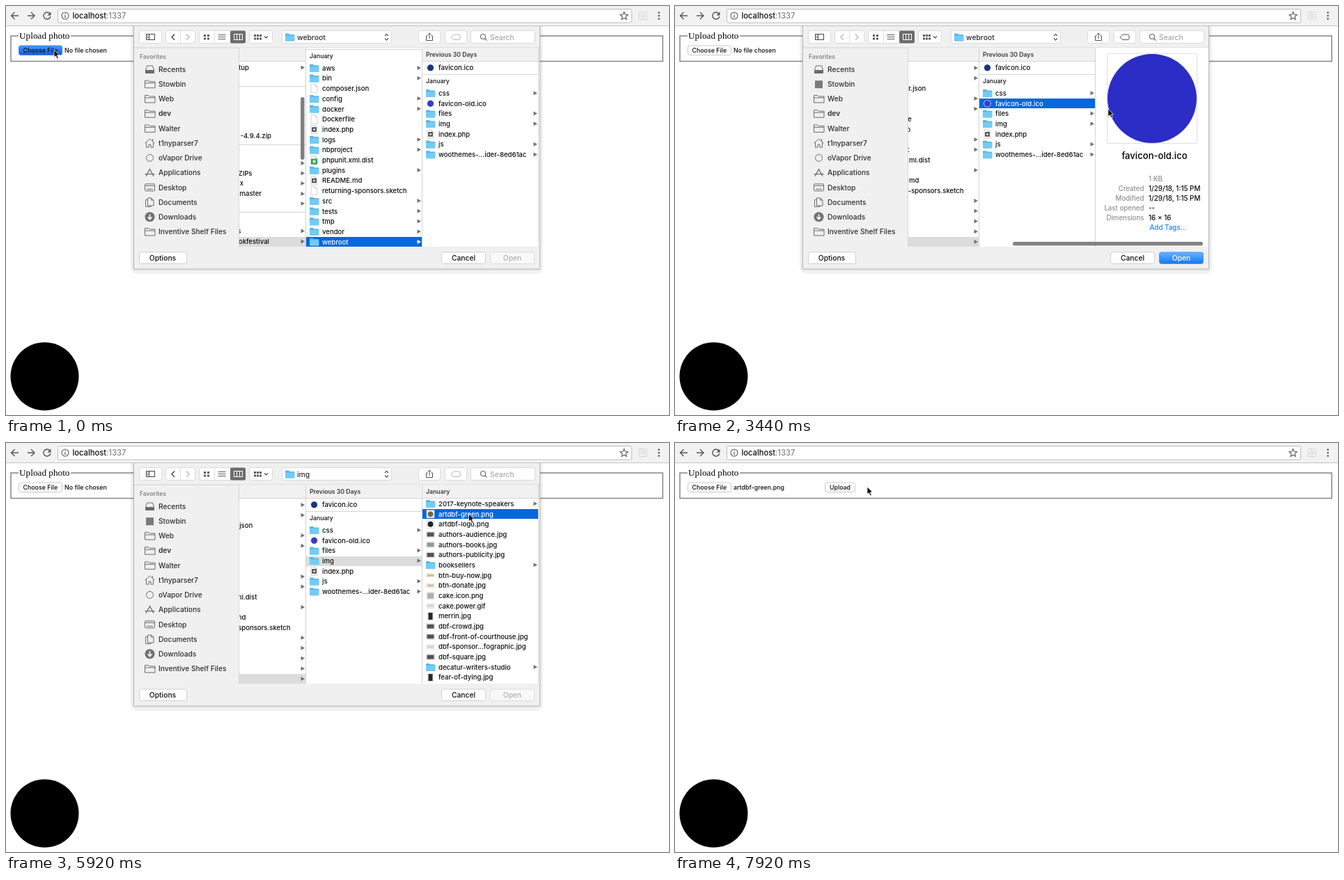
An HTML page for the animation above (8 s loop, 952x588 px).

```html
<!DOCTYPE html>
<html lang="en">
<head>
<meta charset="utf-8">
<title>Upload photo</title>
<style>
  html, body { margin: 0; width: 100%; height: 100%; overflow: hidden; background: #fff; }
  #stage { display: block; width: 100vw; height: 100vh; }
  text { font-family: Inter, "Open Sans", sans-serif; white-space: pre; }
  .serif { font-family: "Liberation Serif", serif; }
</style>
</head>
<body>
<svg id="stage" viewBox="0 0 952 588">
  <defs>
    <linearGradient id="blue" x2="0" y2="1">
      <stop stop-color="#66b4fb"/><stop offset="1" stop-color="#1278f8"/>
    </linearGradient>
    <linearGradient id="pressed" x2="0" y2="1">
      <stop stop-color="#4a9af6"/><stop offset="1" stop-color="#0a5ce4"/>
    </linearGradient>
  </defs>
  <g id="page"></g>
  <svg x="0" y="29" width="952" height="559" viewBox="0 29 952 559"><g id="dialog"></g></svg>
  <g id="cursor"></g>
</svg>
<script>
const LOOP = 8000, TICK = 80;
const INK = '#0c0c0c', GREY = '#6c6c6c', DIM = '#b4b4b4', SELECT = '#0867dc';
const byId = id => document.getElementById(id);

// Drawing helpers; text is placed by its visual centre line.
const text = (x, y, s, size = 9.55, { fill = INK, weight = 450, anchor = 'start', cls = '' } = {}) =>
  `<text class="${cls}" x="${x}" y="${y + size * .36}" font-size="${size}" fill="${fill}" font-weight="${weight}" text-anchor="${anchor}">${s}</text>`;
const rect = (x, y, w, h, fill, rx = 0, extra = '') =>
  `<rect x="${x}" y="${y}" width="${w}" height="${h}" rx="${rx}" fill="${fill}" ${extra}/>`;
const disc = (x, y, r, fill, extra = '') => `<circle cx="${x}" cy="${y}" r="${r}" fill="${fill}" ${extra}/>`;
const line = (d, stroke = GREY, width = 1, fill = 'none') =>
  `<path d="${d}" fill="${fill}" stroke="${stroke}" stroke-width="${width}"/>`;
const solid = (d, fill) => `<path d="${d}" fill="${fill}"/>`;
const button = (x, y, w, h, fill = '#fff', border = '#c6c6c6') =>
  rect(x + .5, y + .5, w - 1, h - 1, fill, 3, `stroke="${border}" stroke-width=".8"`);
const label = (x, y, s, fill = INK) => text(x, y, s, 10.3, { fill, anchor: 'middle' });

const folder = (x, y) =>
  solid(`M${x} ${y - 4.5}q0-1 1-1h4l1.3 1.4h6q1 0 1 1v7.6q0 1-1 1H${x + 1}q-1 0-1-1z`, '#55b7e6') +
  rect(x, y - 2.6, 13.3, 8, '#73cbf3', 1);
const sheet = (x, y) => line(`M${x + 2} ${y - 6}h6l3 3v9h-9zM${x + 8} ${y - 6}v3h3`, '#bdbdbd', .7, '#fff');

// ---- File lists ----
const WEBROOT = 'aws bin composer.json config docker Dockerfile index.php logs nbproject phpunit.xml.dist plugins README.md returning-sponsors.sketch src tests tmp vendor webroot'.split(' ');
const CONTENTS = 'css favicon-old.ico files img index.php js woothemes-...ider-8ed61ac'.split(' ');
const IMAGES = '2017-keynote-speakers artdbf-green.png artdbf-logo.png authors-audience.jpg authors-books.jpg authors-publicity.jpg booksellers btn-buy-now.jpg btn-donate.jpg cake.icon.png cake.power.gif merrin.jpg dbf-crowd.jpg dbf-front-of-courthouse.jpg dbf-sponsor...fographic.jpg dbf-square.jpg decatur-writers-studio fear-of-dying.jpg'.split(' ');
const isFolder = name => name !== 'Dockerfile' && !/\.\w+$/.test(name);

function thumbnail(name, x, y) {
  const frame = (w, h, fill) =>
    rect(x + 6.5 - w / 2, y - h / 2, w, h, '#fff', 0, 'stroke="#ccc" stroke-width=".6"') +
    rect(x + 7.5 - w / 2, y + 1 - h / 2, w - 2, h - 2, fill);
  if (/^artdbf/.test(name)) return frame(11, 11, '#fff') + disc(x + 6.5, y, 4, /green/.test(name) ? '#716a43' : '#222');
  if (/^(merrin|fear)/.test(name)) return frame(8, 12, '#252825');
  if (/^btn/.test(name)) return frame(11, 5, '#d9b77c');
  if (/power|sponsor/.test(name)) return frame(11, 6, '#d5d5d0');
  if (/icon/.test(name)) return frame(11, 10, '#b7aca7');
  return frame(12, 8, /books/.test(name) ? '#8d9994' : '#565150');
}

function fileIcon(name, x, y) {
  if (isFolder(name)) return folder(x, y);
  if (/\.ico$/.test(name)) return disc(x + 6.5, y, 5.3, '#dcdcf0') + disc(x + 6.5, y, 4.5, /old/.test(name) ? '#3a3ac4' : '#17347d');
  if (/\.(png|jpg|gif)$/.test(name)) return thumbnail(name, x, y);
  if (/\.(php|md)$/.test(name)) return sheet(x, y) + rect(x + 3.2, y - 3.2, 6.6, 6.6, '#4b4b4b') + rect(x + 5, y - 1.2, 3, 2.6, '#ddd');
  if (/xml/.test(name)) return sheet(x, y) + rect(x + 2, y - 2, 9, 8, '#2f9d58') + rect(x + 4.5, y, 4, 4, '#c7ead3');
  return sheet(x, y);
}

const arrow = (x, y, fill = '#727272') => solid(`M${x - 2.5} ${y - 3}l5.5 3l-5.5 3z`, fill);

function row(name, x, y, mark) {
  const on = mark === 'active';
  return (mark ? rect(x, Math.round(y - 7), 167, 14, on ? SELECT : '#dcdcdc') : '') +
    fileIcon(name, x + 5, y) + text(x + 23, y, name, 9.55, { fill: on ? '#fff' : INK }) +
    (isFolder(name) ? arrow(x + 162, y - .3, on ? '#fff' : undefined) : '');
}

// ---- Finder columns ----
function parentColumn(x) {
  const ends = [[349, 89, 'tup'], [381, 187, '-4.9.4.zip'], [353.5, 240.5, 'ZIPs'], [341, 255, 'x'],
    [367, 270, 'master'], [337.5, 324, 's'], [378, 338.8, 'okfestival']];
  return rect(x, 332, 167, 14, '#dcdcdc') +
    ends.map(([end, y, s]) => text(x + end - 264, y, s, 9.55, { anchor: 'end' })).join('') +
    [115.5, 199.5, 296.5].map(y => line(`M${x} ${y}h167`, '#d4d4d4')).join('') +
    [88.5, 142, 157, 171, 226, 240.5, 255, 270, 284, 323.5, 338.5].map(y => arrow(x + 162, y)).join('');
}

function preview(x, { name, kind, size, color }) {
  const facts = [['', kind], ['Created', '1/29/18, 1:15 PM'], ['Modified', '1/29/18, 1:15 PM'],
    ['Last opened', '--'], ['Dimensions', size]];
  return rect(x + 16.5, 68.5, 129, 129, '#fff', 1, 'stroke="#dedede"') + disc(x + 81, 133, 64, color) +
    text(x + 84.5, 215.7, name, 13.1, { anchor: 'middle', fill: '#000' }) +
    facts.map(([key, value], i) => {
      const y = 248.5 + 14 * i;
      return text(x + 69.5, y, key, 9.7, { fill: '#8f8f8f', anchor: 'end' }) +
        text(x + 76, y, value, 9.9, { fill: i ? INK : '#8f8f8f' });
    }).join('') + text(x + 77.5, 318.5, 'Add Tags...', 9.8, { fill: '#1a84f5' });
}

function columns(s) {
  const at = i => 264 + 167 * i - s.scroll;
  const mark = (i, name) => s.chosen[i] !== name ? '' : i === s.chosen.length - 1 ? 'active' : 'path';
  const list = (i, names, top, step) => names.map((n, k) => row(n, at(i), top + step * k, mark(i, n))).join('');
  const head = (i, title) => text(at(i) + 5, 70, title, 8.7, { weight: 600, fill: '#3c3c3c' });
  let out = rect(334, 60, 432, 286, '#fff') + rect(334, 60, 432, 19, '#f1f1f1') + line('M334 79.5H766', '#d6d6d6');
  out += parentColumn(at(0));
  out += s.opening
    ? rect(at(1), 60, 167, 20, '#fff') + line(`M${at(1)} 62.5h167`, '#d4d4d4') + text(at(1) + 5, 72, 'January', 8.7)
    : head(1, 'March');
  out += list(1, WEBROOT, 89.3, 14.7);
  out += head(2, 'Previous 30 Days') + row('favicon.ico', at(2), 88.8, '') + line(`M${at(2)} 98.5h167`, '#d4d4d4') +
    text(at(2) + 5, 108, 'January', 8.7) + list(2, CONTENTS, 125.5, 14.7);
  if (s.folder === 'img') out += head(3, 'January') + list(3, IMAGES, 87.5, 14.68);
  if (s.file) {
    const x = at(s.folder === 'img' ? 4 : 3);
    out += rect(x, 60, 180, 286, '#fff') + preview(x, s.file);
  }
  for (let i = 1; i < 5; i++) out += line(`M${at(i) - .5} 60V346`, '#d4d4d4');
  if (s.vbar) out += rect(423, 131, 5.5, 90, '#808080', 2.7);
  if (s.bar) out += rect(s.bar, 339, 758 - s.bar, 5.5, '#828282', 2.7);
  return `<svg x="334" y="60" width="432" height="286" viewBox="334 60 432 286">${out}</svg>`;
}

// ---- Dialog chrome ----
function sidebar(s) {
  const tray = y => line(`M200.5 ${y + 1}l2-6h8l2 6v4.5h-12z`) + rect(201, y + 1, 11, 4, GREY);
  const plainFolder = y => line(`M199.5 ${y - 5}h5l1.5 1.5h8v9h-14.5zM199.5 ${y - 1.5}h14.5`);
  const square = y => rect(201, y - 5, 11, 11, '#7a7a7a');
  const home = y => line(`M199.5 ${y}l7-6l7 6M201.5 ${y - 1}v7h3.5v-4h3v4h3.5v-7M210.5 ${y - 3}v-3`);
  const ring = y => disc(206.5, y, 5, 'none', `stroke="${GREY}"`);
  const tools = y => line(`M201 ${y + 5}l5.5-10l5.5 10M199.5 ${y + 2}h14`, GREY, 1.2);
  const desk = y => rect(199.5, y - 5, 14, 10, '#eee', 1, `stroke="${GREY}"`) + line(`M200 ${y - 2.5}h13M202 ${y + 2.5}h9`);
  const docs = y => line(`M203.5 ${y - 6}h5l3.5 3v8h-8.5zM208.5 ${y - 6}v3h3.5M203 ${y - 3.5}h-2.5v10h7.5v-1.5`);
  const down = y => disc(206.5, y, 7, '#717171') + line(`M206.5 ${y - 4}v7M203.5 ${y}l3 3.5l3-3.5`, '#fff', 1.5);
  const items = [['Recents', tray], ['Stowbin', s.opening ? plainFolder : square], ['Web', plainFolder],
    ['dev', plainFolder], ['Walter', plainFolder], ['t1nyparser7', home], ['oVapor Drive', ring],
    ['Applications', tools], ['Desktop', desk], ['Documents', docs], ['Downloads', down],
    ['Inventive Shelf Files', plainFolder]];
  return text(192, 72.5, 'Favorites', 8.5, { weight: 600, fill: '#868686' }) +
    items.map(([name, icon], i) => {
      const y = 91 + 21.23 * i;
      return icon(y) + text(219, y, name, 10.2, { fill: '#2e2e2e', weight: name === 'dev' ? 600 : 450 });
    }).join('');
}

function toolbar(s) {
  const wells = [[191, 33], [229, 43], [277, 67], [349, 34], [396, 158], [592, 32], [630, 32], [667, 93]];
  let dots = '';
  for (const [x, n, gap] of [[284, 2, 5], [356, 3, 4]])
    for (let k = 0; k < n * 2; k++) dots += rect(x + gap * (k % n), 41 + (k / n | 0) * 4.5, 3, 3, '#5d5d5d');
  return wells.map(([x, w]) => button(x, 35, w, 19, '#fff', '#d4d4d4')).join('') +
    line('M250.5 36v17M299.5 36v17', '#dedede') + rect(322, 35.5, 22, 18, '#6c6c6c', 2) +
    rect(201.5, 40.5, 12, 8, '#fff', 0, 'stroke="#444"') + line('M205.5 40.5v8M202.5 43h2M202.5 45.5h2', '#444') +
    line('M242 40.5l-4 4.2l4 4.2', s.back ? '#333' : DIM, 1.3) + line('M259 40.5l4 4.2l-4 4.2', DIM, 1.3) +
    dots + line('M304.5 41.5h11M304.5 44.5h11M304.5 47.5h11', '#555') +
    rect(327.5, 40.5, 12, 8, 'none', 0, 'stroke="#fff"') + line('M331.5 40.5v8M335.5 40.5v8', '#fff') +
    line('M371 43.5l2.5 2.5l2.5-2.5', '#444', 1.2) +
    folder(401, 45) + text(418, 45, s.folder, 10.35, { fill: '#2c2c2c' }) +
    line('M544 43l2.5-2.7l2.5 2.7M544 46.5l2.5 2.7l2.5-2.7', '#555', 1.2) +
    line('M605.5 43h-2v6.5h9v-6.5h-2M608 47v-8M605.5 41.5l2.5-2.5l2.5 2.5', '#505050') +
    line('M642.5 41h8q1.5 0 1.5 1.5v4.5q0 1.5-1.5 1.5h-8l-3.5-3.7z', s.file ? '#555' : DIM) +
    disc(685, 44, 3.5, 'none', 'stroke="#666" stroke-width="1.1"') + line('M687.5 46.5l3 3', '#666', 1.3) +
    text(695, 45, 'Search', 10.3, { fill: '#a5a5a5' });
}

function openButton(s) {
  const [fill, border, ink] = s.pressed ? ['url(#pressed)', '#1f6ee0', '#fff']
    : s.file ? ['url(#blue)', '#3a8cf4', '#fff'] : ['#f8f8f8', '#dadada', '#b0b0b0'];
  return button(695, 353.5, 64, 17.5, fill, border) + label(727, 362, 'Open', ink);
}

const dialog = s =>
  rect(179, 20, 592, 365, '#000', 9, 'opacity=".055"') + rect(182, 20, 586, 360, '#000', 4, 'opacity=".08"') +
  rect(183.5, 20, 583, 358, '#f0f0f0', 0, 'stroke="#bcbcbc"') +
  toolbar(s) + line('M184 60H766', '#d0d0d0') + sidebar(s) + columns(s) + line('M334.5 60V346', '#d6d6d6') +
  button(191, 353.5, 69, 17.5) + label(225, 362, 'Options') +
  button(625, 353.5, 64, 17.5) + label(657, 362, 'Cancel') + openButton(s);

const page = s =>
  rect(0, 0, 952, 28, '#f2f2f2') + line('M0 28.5H952', '#c3c3c3') +
  line('M18 14H8M12.5 9l-5 5l5 5M31 14h10M36 9l5 5l-5 5', '#555', 1.4) +
  line('M62.8 10.8A5 5 0 1 0 63.8 15', '#555', 1.4) + solid('M64.5 8.5v5h-5z', '#555') +
  rect(74.5, 4.5, 824, 19.5, '#fff', 2, 'stroke="#bdbdbd"') +
  disc(85, 14, 5, 'none', 'stroke="#555" stroke-width="1.1"') + line('M85 13v4M85 10.5v1.3', '#555', 1.2) +
  text(95.5, 14, 'localhost<tspan fill="#808080">:1337</tspan>', 11.15) +
  line('M887.5 8.5l1.6 3.7l4 .4l-3 2.7l.9 4l-3.5-2.1l-3.5 2.1l.9-4l-3-2.7l4-.4z', '#5c5c5c', 1.1) +
  rect(909, 8.5, 11, 11, '#f0f0f0', 1, 'stroke="#c8c8c8" stroke-dasharray="2 1"') + disc(914.5, 14, 2.5, 'none', 'stroke="#d0d0d0"') +
  [9.5, 14, 18.5].map(y => disc(937.5, y, 1.3, '#555')).join('') +
  rect(7, 43, 936, 36.5, 'none', 0, 'stroke="#858585" stroke-width="1.5"') + rect(18, 38, 75, 10, '#fff') +
  text(19, 42.7, 'Upload photo', 13.25, { cls: 'serif', fill: '#000' }) +
  button(18, 56.5, 63, 14.5, s.opening ? 'url(#pressed)' : '#fff', s.opening ? '#2b78e4' : '#bbb') +
  text(49.3, 63.7, 'Choose File', 8.85, { anchor: 'middle' }) +
  text(84, 63.7, s.done ? 'artdbf-green.png' : 'No file chosen', 8.85) +
  button(215, 56.5, 44, 14.5, '#fff', '#bbb') + text(237, 63.7, 'Upload', 8.85, { anchor: 'middle' }) +
  disc(55.5, 532.5, 49, '#000');

// ---- Timeline ----
const ROOT = ['bookfestival', 'webroot'];
const steps = [
  [0, { scroll: 0, folder: 'webroot', chosen: ROOT, opening: true, back: true, vbar: true }],
  [80, { opening: false, back: false }],
  [400, { vbar: false }],
  [3040, { chosen: [...ROOT, 'favicon-old.ico'] }],
  [3120, { scroll: 161, bar: 485, file: { name: 'favicon-old.ico', kind: '1 KB', size: '16 × 16', color: '#2c2cc6' } }],
  [4320, { bar: 0 }],
  [4560, { scroll: 167, folder: 'img', chosen: [...ROOT, 'img'], file: null, back: true }],
  [5920, { chosen: [...ROOT, 'img', 'artdbf-green.png'] }],
  [6000, { scroll: 336.5, bar: 540, file: { name: 'artdbf-green.png', kind: 'PNG image - 4 KB', size: '322 × 322', color: '#6f8b3c' } }],
  [6320, { bar: 0 }],
  [6560, { pressed: true }],
  [6960, { done: true }]
];
const path = [[0, 69, 63], [880, 403, 110], [1120, 403, 110], [2000, 545, 130], [2800, 652, 140], [3280, 652, 140],
  [3840, 500, 181], [4000, 500, 181], [4160, 488, 174], [4320, 473, 168], [4640, 473, 168], [5520, 663.5, 105],
  [5760, 664.5, 102], [7200, 664.5, 102], [7520, 322, 192], [7680, 322, 192], [7920, 276, 63]];
const POINTER = line('M0 0V10.8L2.5 8.5L4.3 12.7L6.2 11.9L4.4 7.8H7.8Z', '#fff', .8, '#000');
const RESIZE = line('M0-6V6M-5 0H5', '#fff', 3) + line('M0-6V6M-5 0H5', '#000', 1.4) +
  solid('M-6.5 0l3.5-3v6zM6.5 0l-3.5-3v6z', '#000');

const clamp = v => Math.max(0, Math.min(1, v));
const ease = v => v * v * (3 - 2 * v);

function cursorAt(t) {
  const i = path.findIndex(p => p[0] > t);
  if (i < 0) return path[path.length - 1].slice(1);
  const [t0, x0, y0] = path[i - 1], [t1, x1, y1] = path[i];
  const p = ease((t - t0) / (t1 - t0));
  return [x0 + (x1 - x0) * p, y0 + (y1 - y0) * p];
}

let shown = 0;
function draw(now) {
  const t = Math.floor(now % LOOP / TICK) * TICK;
  const past = steps.filter(([start]) => start <= t);
  if (past.length !== shown) {
    shown = past.length;
    const state = Object.assign({}, ...past.map(([, change]) => change));
    byId('page').innerHTML = page(state);
    byId('dialog').innerHTML = dialog(state);
  }
  byId('dialog').setAttribute('transform', `translate(0 ${-376 * ease(clamp((t - 6560) / 320))})`);
  byId('cursor').innerHTML = t >= 880 && t < 1200 ? RESIZE : POINTER;
  byId('cursor').setAttribute('transform', `translate(${cursorAt(t)})`);
}

const start = performance.now();
function loop() {
  draw(performance.now() - start);
  requestAnimationFrame(loop);
}
loop();
</script>
</body>
</html>
```
